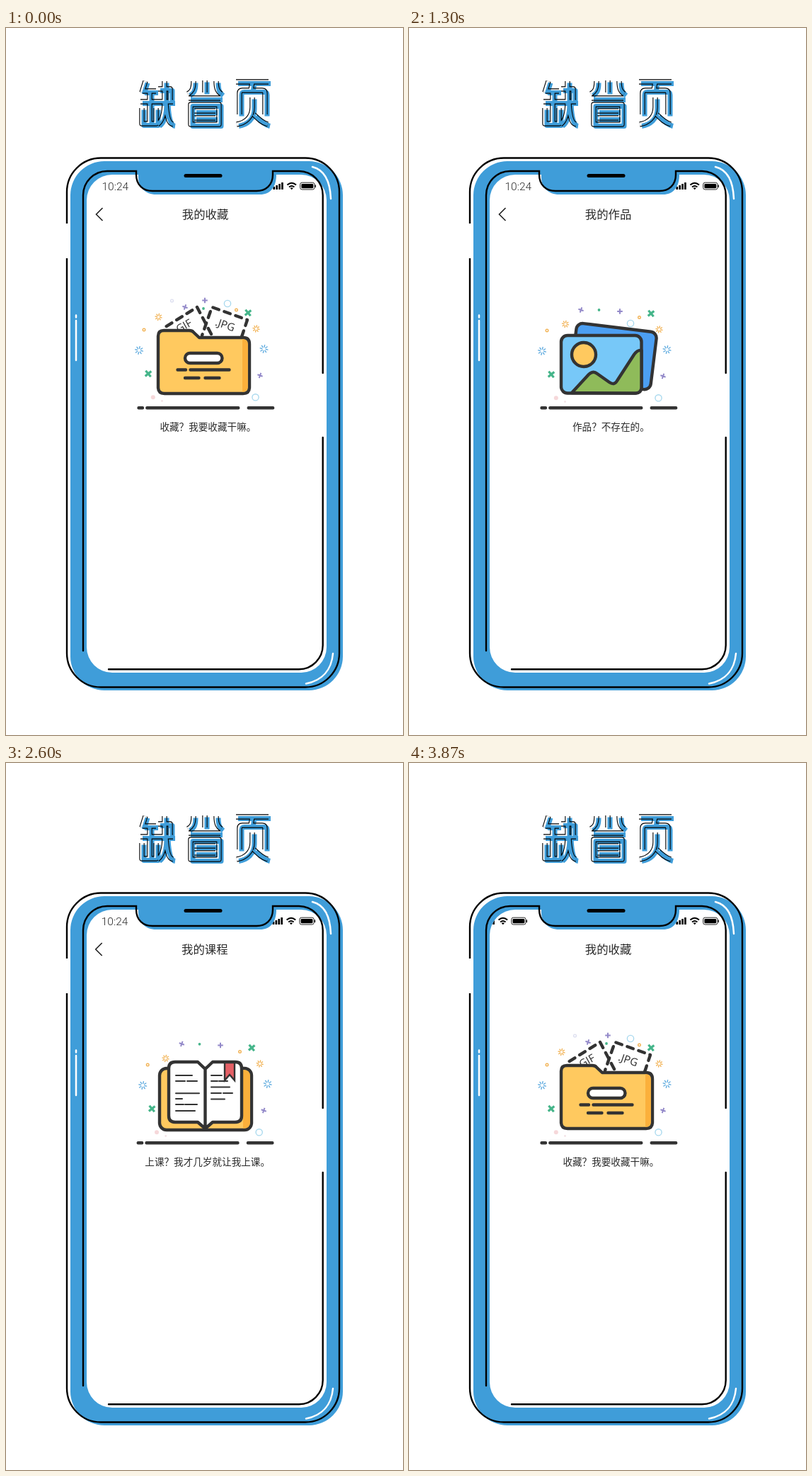
An HTML page for the animation above (3.9 s loop, 561 px wide and 998 px high).

```html
<!DOCTYPE html>
<html lang="zh-CN">
<head>
<meta charset="utf-8">
<style>
html, body { margin: 0; width: 100%; height: 100%; overflow: hidden; background: #fff; }
svg { display: block; width: 561px; height: 998px; }
text { font-family: "Noto Sans CJK SC", "Noto Sans CJK", sans-serif; font-weight: 300; fill: #2b2b2b; }
.clock { font: 300 15.5px Roboto, sans-serif; }
.tag { font: 500 15px "Open Sans", sans-serif; text-anchor: middle; }
.ink { stroke: #333; stroke-width: 4.4; stroke-linecap: round; stroke-linejoin: round; }
.line { fill: none; stroke: #000; stroke-width: 2.4; }
.shine { fill: none; stroke: #fff; stroke-width: 2.5; stroke-linecap: round; }
</style>
</head>
<body>
<svg id="stage" viewBox="0 0 561 998"></svg>
<script>
const BLUE = '#3f9dd9', SKY = '#a9d9ee', AZURE = '#5fabdf', AMBER = '#f2b458',
      GREEN = '#45b58a', PURPLE = '#9389c9', GOLD = '#ffc95f', SHADE = '#fbb03b';

const path = (d, attrs = '') => `<path d="${d}" ${attrs}/>`;
const ink = (d, fill = 'none', attrs = '') => path(d, `class="ink" fill="${fill}" ${attrs}`);
const rect = (x, y, w, h, r, attrs) =>
  `<rect x="${x}" y="${y}" width="${w}" height="${h}" rx="${r}" ${attrs}/>`;
const circle = (x, y, r, attrs) => `<circle cx="${x}" cy="${y}" r="${r}" ${attrs}/>`;

// Confetti
const dot = (x, y, r, color) => circle(x, y, r, `fill="${color}"`);
const ring = (x, y, r, color) => circle(x, y, r, `fill="none" stroke="${color}" stroke-width="1.4"`);
const cross = (x, y, size, color, turn, width) =>
  path(`M${-size},0H${size}M0,${-size}V${size}`,
    `transform="translate(${x} ${y}) rotate(${turn})" stroke="${color}" stroke-width="${width}"`);
const plus = (x, y, turn = 0) => cross(x, y, 3.8, PURPLE, turn, 2);
const star = (x, y) => cross(x, y, 5.6, GREEN, 50, 3.2);
const burst = (x, y, r, color) => {
  let rays = '';
  for (let i = 0; i < 8; i++) {
    const c = Math.cos(i * Math.PI / 4 + .2), s = Math.sin(i * Math.PI / 4 + .2);
    rays += `M${c * r * .5},${s * r * .5}L${c * r},${s * r}`;
  }
  return path(rays, `transform="translate(${x} ${y})" stroke="${color}" stroke-width="1.4" stroke-linecap="round"`);
};
const confetti = (dx, dy) => `<g transform="translate(${dx} ${dy})">
  ${burst(188, 456, 5.5, AZURE)}${burst(364.5, 454, 5.5, AZURE)}${burst(353.5, 425.5, 4.6, AMBER)}
  ${star(201, 489)}${star(342, 403)}${plus(359, 491.5, 20)}
  ${ring(195, 427, 1.8, AMBER)}${ring(352.5, 522.3, 4.6, SKY)}
  ${dot(207.8, 522.3, 3, '#f6d8da')}${dot(220.5, 527.5, 1.4, '#f3e3e6')}</g>`;

const folder = () => confetti(0, -1) + ring(234.5, 385, 1.9, '#dddff0') +
  plus(253, 394, 20) + plus(281, 384.5) + dot(279, 396, 1.9, GREEN) + ring(313, 389, 4.6, SKY) +
  ring(325.5, 398, 1.8, AMBER) + burst(215.5, 408, 4.6, AMBER) +
  ink('M290,432L270,394L222,424', 'none', 'stroke-dasharray="9 8"') +
  ink('M333,436L341,412L291,394L277,434', 'none', 'stroke-dasharray="9 8"') +
  '<text class="tag" transform="translate(254 425) rotate(-29)">GIF</text>' +
  '<text class="tag" transform="translate(308 424) rotate(19)">.JPG</text>' +
  ink('M215,435q0,-8 8,-8H259q4,0 6,2.5L273,437H335q9,0 9,9V507q0,9 -9,9H224q-9,0 -9,-9Z', GOLD) +
  path('M334,439.3q7.7,0 7.7,7V506q0,7.7 -7.7,7.7Z', `fill="${SHADE}"`) +
  rect(253, 459, 52.5, 14, 7, 'class="ink" fill="#fff"') +
  ink('M242.5,482.5h11.5M260.5,482.5h55M253,494h19.5M281.5,494h20');

const pictures = () => confetti(0, 0) + plus(243, 398, 20) + dot(268.5, 398, 1.9, GREEN) +
  plus(298, 400) + ring(313, 417, 4.6, SKY) + ring(325.5, 408.5, 1.8, AMBER) + burst(221, 418, 4.6, AMBER) +
  rect(0, 0, 114, 82, 9, 'class="ink" fill="#4c9ff2" transform="translate(237.5 416) rotate(7)"') +
  rect(215, 434, 113.5, 81.5, 9, 'class="ink" fill="#77c8f8"') +
  ink('M230,515L254,489Q260,483 266,488L283,500Q290,505 294,498L318,461Q323,454 328.5,455V507q0,8.5 -8.5,8.5Z', '#8fbb5a') +
  circle(247, 461, 17, `class="ink" fill="${GOLD}"`);

const book = () => confetti(5.2, -1) + plus(248.3, 396.5, 20) + dot(273.5, 396.8, 1.9, GREEN) +
  plus(303, 398.5) + ring(330.5, 407.5, 1.8, AMBER) + burst(225.5, 417, 4.6, AMBER) +
  rect(217, 431, 130, 87, 10, `class="ink" fill="${GOLD}"`) +
  path('M335,433.2q9.8,0 9.8,8V508q0,7.8 -9.8,7.8Z', `fill="${SHADE}"`) +
  ink('M281.5,432L271,422H239q-9,0 -9,9V498q0,9 9,9H271L281.5,516L292,507H324q9,0 9,-9V431q0,-9 -9,-9H292ZV516', '#fff') +
  path('M309,423V448L316,440L323,448V423Z', 'fill="#e45f65" stroke="#333" stroke-width="2.4"') +
  path('M240,441h23M240,449h13M256,449h14M240,466.3h33M240,474h9M240,482h11M253,482h17M240,491h27' +
    'M290,441h15M290,449h9M301,449h12M290,457.5h26M290,466h14M307,466h13M290,474.5h19',
    'stroke="#333" stroke-width="2" stroke-linecap="round"');

const chrome = title => `<text class="clock" x="135.5" y="228.5">10:24</text>
  <text x="248.8" y="269" font-size="16.4">${title}</text>
  ${path('M136.5,254L127.5,263L136.5,272', 'fill="none" stroke="#222" stroke-width="1.6"')}
  ${[0, 1, 2, 3].map(i => rect(377.4 + i * 3.9, 224 - i * 2, 2.7, 4 + i * 2, .6, '')).join('')}
  ${path('M397.4,221.6q6.3,-5.6 12.6,0M400,224.6q3.7,-3.2 7.4,0', 'fill="none" stroke="#000" stroke-width="2"')}
  ${path('M401.6,226.1q2.1,-1.7 4.2,0L403.7,228.3Z')}
  ${rect(415.7, 218.2, 20.2, 9.8, 2.6, 'fill="none" stroke="#222"')}
  ${rect(417.4, 219.9, 16.8, 6.4, 1.2, '')}${rect(436.6, 221.2, 1.3, 4, .6, '')}
  ${ink('M187.5,536.3h5.5M199.3,536.3h129M342.7,536.3h34.5')}`;

const page = (title, art, caption, x, dx = 0) => `<g class="page">
  ${rect(110, 200, 338.5, 715, 0, 'fill="#fff"')}<g transform="translate(${dx} 0)">${chrome(title)}</g>
  ${art()}<text x="${x}" y="568" font-size="13.6">${caption}</text></g>`;

const favourites = page('我的收藏', folder, '收藏？我要收藏干嘛。', 217.4);
const works = page('我的作品', pictures, '作品？不存在的。', 231);
const lessons = page('我的课程', book, '上课？我才几岁就让我上课。', 196.3, -.8);

// Headline lettering: one skeleton, drawn as a blue shadow and a thin outline
const letters = path(
  'M197,75L192,91M193,89H212M190,104H213M203,89V134M192,113V135H212V113' +
  'M215,86H232V104M213,104H236M224,75V104C224,120 221,131 214,136M226,106C227,122 229,135 236,136' +
  'M265,75C265,87 262,90 257,93M281,74V91M281,74V91M297,75C297,87 300,90 304,93' +
  'M258,99H303M261,136V108H301V136ZM266,117H296M266,127H296' +
  'M325,76H371M348,76L346,88M330,122V92Q330,88 334,88H362Q366,88 366,92V122' +
  'M348,98V112C348,126 338,134 326,136M350,122C356,128 362,134 370,136',
  'id="letters" fill="none" stroke-linejoin="round"');

const screen = 'M150,207H417a36,36 0 0 1 36,36V874a36,36 0 0 1 -36,36H150a36,36 0 0 1 -36,-36V243a36,36 0 0 1 36,-36Z';
const shell = 'M139,188H428a48,48 0 0 1 48,48V887a48,48 0 0 1 -48,48H139a48,48 0 0 1 -48,-48V236a48,48 0 0 1 48,-48Z';

document.getElementById('stage').innerHTML = `<defs>${letters}
  <clipPath id="screen">${path(screen)}</clipPath>
  <mask id="outline" maskUnits="userSpaceOnUse" x="180" y="60" width="210" height="90">
    <use href="#letters" stroke="#fff" stroke-width="7.4"/><use href="#letters" stroke="#000" stroke-width="5.2"/>
  </mask></defs>
  <use href="#letters" stroke="${BLUE}" stroke-width="7" x="3" y="2.5"/>
  ${rect(180, 60, 210, 90, 0, 'mask="url(#outline)"')}
  <g clip-path="url(#screen)">${favourites}${lessons}${works}${favourites}</g>
  ${path(shell + screen, `fill="${BLUE}" fill-rule="evenodd"`)}
  ${path('M187,206V211C187,225 197,235 212,235H359C373,235 382,225 382,207V206Z', `fill="${BLUE}"`)}
  ${path('M86,276V232A48,48 0 0 1 134,183.5H423A48,48 0 0 1 471,232V882A48,48 0 0 1 423,930.5H134A48,48 0 0 1 86,882V325', 'class="line"')}
  ${path('M109,879V236A34,34 0 0 1 143,202H184V207C184,222 194,230 207,230H354C367,230 377,222 377,207V202H414A34,34 0 0 1 447.7,236V487M447.7,578V871A34,34 0 0 1 414,905.3H145', 'class="line" stroke-linecap="round"')}
  ${path('M254,208.5H303', 'stroke="#000" stroke-width="5" stroke-linecap="round"')}
  ${path('M433,196C449,200 458,215 459,241M462,883C460,906 447,921 424,925.5M99,405.5v3M99,413v56', 'class="shine"')}`;

// The pages lie in a pile; each one backs up a little, then speeds off to the left
const pile = [...document.querySelectorAll('.page')].reverse();
const SPAN = 1300, REST = 1000, STEP = 30;
const start = performance.now();

function draw(now) {
  const time = Math.max(0, now - start) % (SPAN * 3);
  const top = Math.floor(time / SPAN);
  const u = Math.max(0, Math.floor((time % SPAN - REST) / STEP)) / 10;
  const shift = 87.8 * u - 431 * u * u;
  pile.forEach((layer, i) => {
    layer.style.display = i < top ? 'none' : '';
    layer.setAttribute('transform', `translate(${i === top ? shift : 0} 0)`);
  });
  requestAnimationFrame(draw);
}
draw(start);
</script>
</body>
</html>
```
